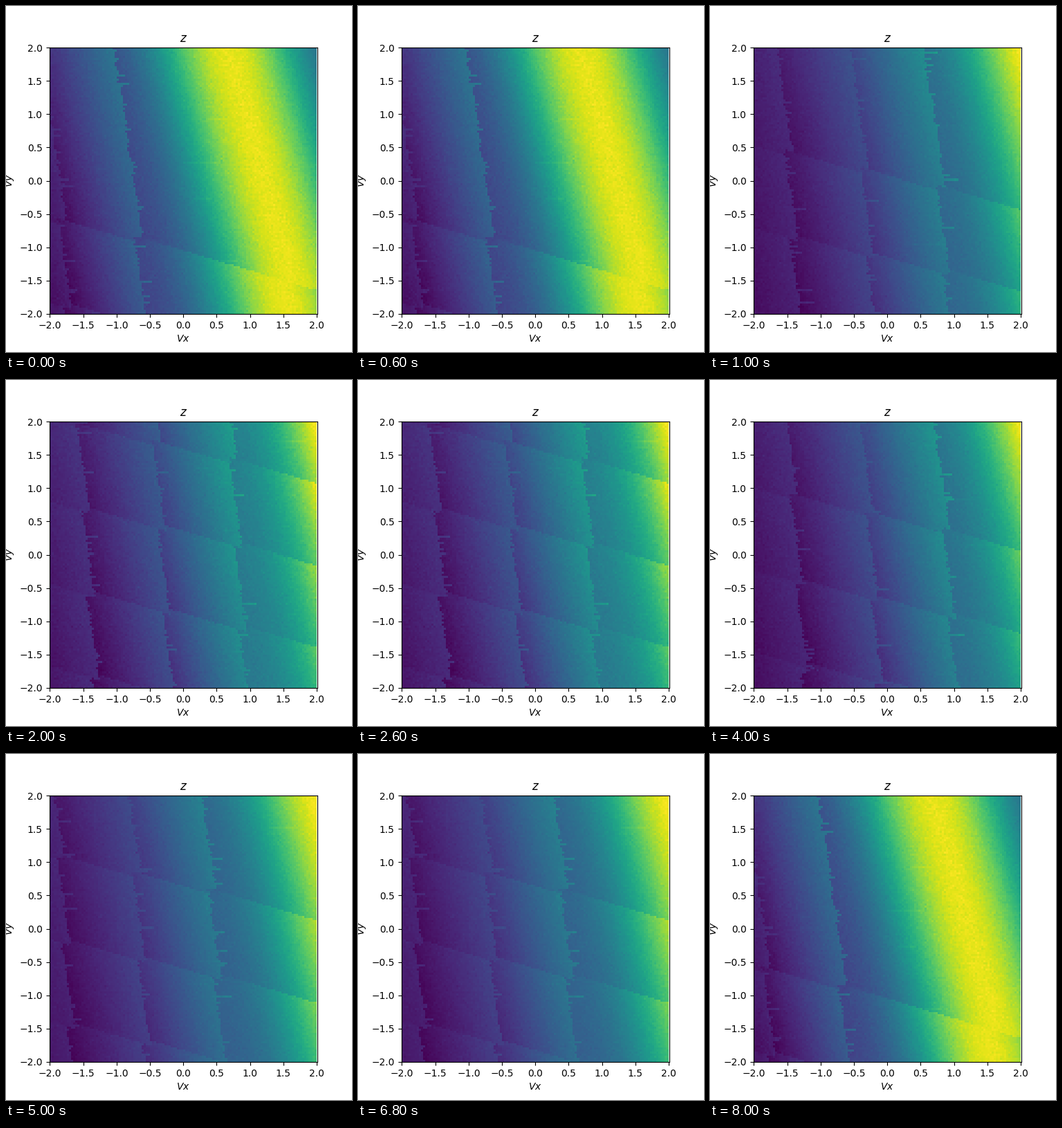
A matplotlib script for the animation above (9 s loop, 500 by 500 pixels).

```python
import numpy as np
import matplotlib.pyplot as plt
from matplotlib.animation import FuncAnimation

N = 128                            # cells per side
STEP_X = np.array([1.14, -0.26])   # lattice step from one column to the next
STEP_Y = np.array([0.07, -1.25])   # lattice step from one row down to the next
LEAN, DIP = 0.15, 0.30             # slopes of the steep and shallow borders
TILT, ROW_DROP = 0.27, 0.09        # slope of equal brightness, loss per row

# corner where the last column meets the first row border, per picture
CORNERS = [(-0.75, -0.82), (0.72, -0.05), (0.66, 1.47),
           (0.78, 0.66), (0.80, 0.41), (0.36, 0.61)]
ORDER = [0, 1, 2, 3, 4, 5, 5, 5, 0]  # picture shown in each second

edges = np.linspace(-2, 2, N + 1)
mid = (edges[:-1] + edges[1:]) / 2
X, Y = np.meshgrid(mid, mid)


def border_jags(rng):
    """Rightward overshoot of each steep border, row by row."""
    jag = rng.uniform(-0.01, 0.035, (N, 5))
    spikes = rng.random((N, 5)) < 0.16
    return jag + spikes * np.minimum(rng.exponential(0.06, (N, 5)), 0.2)


def column_index(dx, dy, row, jag):
    e = dx - (row - 1) * STEP_Y[0] + LEAN * (dy - (row - 1) * STEP_Y[1])
    width = STEP_X[0] + LEAN * STEP_X[1]
    return sum((e - jag[:, j:j + 1] < -j * width).astype(int) for j in range(5))


def row_index(dx, dy, col):
    g = dy + col * STEP_X[1] + DIP * (dx + col * STEP_X[0])
    height = -(STEP_Y[1] + DIP * STEP_Y[0])
    return np.maximum(0, np.ceil(-g / height)).astype(int)


def level(col, t):
    """Brightness inside a cell: a hill in the last column, ramps elsewhere."""
    hill = 0.27 + 0.73 * np.exp(-0.5 * ((t - 1.92) / 0.81) ** 2)
    ramps = [0.17 + 0.24 * t, 0.05 + 0.16 * t, 0.01 + 0.09 * t]
    return np.select([col == 0, col == 1, col == 2], [hill, *ramps[:2]], ramps[2])


def field(pic):
    rng = np.random.default_rng(40 + pic)
    jag = border_jags(rng)
    dx, dy = X - CORNERS[pic][0], Y - CORNERS[pic][1]
    row = np.ones((N, N), int)
    for _ in range(3):
        col = column_index(dx, dy, row, jag)
        row = row_index(dx, dy, col)
    lx = dx + col * STEP_X[0] - (row - 1) * STEP_Y[0]
    ly = dy + col * STEP_X[1] - (row - 1) * STEP_Y[1]
    t = lx + TILT * ly - ROW_DROP * row
    # a few faint horizontal streaks
    for r, c in zip(rng.integers(0, N, 4), rng.integers(60, 110, 4)):
        t[r, c:c + rng.integers(8, 18)] += 0.05
    v = level(col, t)
    v += rng.normal(0, 0.006 + 0.006 * v)
    return (v - v.min()) / (v.max() - v.min())


fig, ax = plt.subplots(figsize=(5, 5), dpi=100)
mesh = ax.pcolormesh(edges, edges, np.zeros((N, N)), cmap="viridis", vmin=0, vmax=1)
ax.set(xlim=(-2.01, 2.01), ylim=(-2, 2), title="$z$", xlabel="$Vx$", ylabel="$Vy$")
ax.set_xticks(np.arange(-2, 2.1, 0.5))
ax.set_yticks(np.arange(-2, 2.1, 0.5))

fields = [field(p) for p in range(len(CORNERS))]


def draw(i):
    mesh.set_array(fields[ORDER[i]])
    return [mesh]


anim = FuncAnimation(fig, draw, frames=len(ORDER), interval=1000,
                     repeat=True, repeat_delay=0)
plt.show()
```
